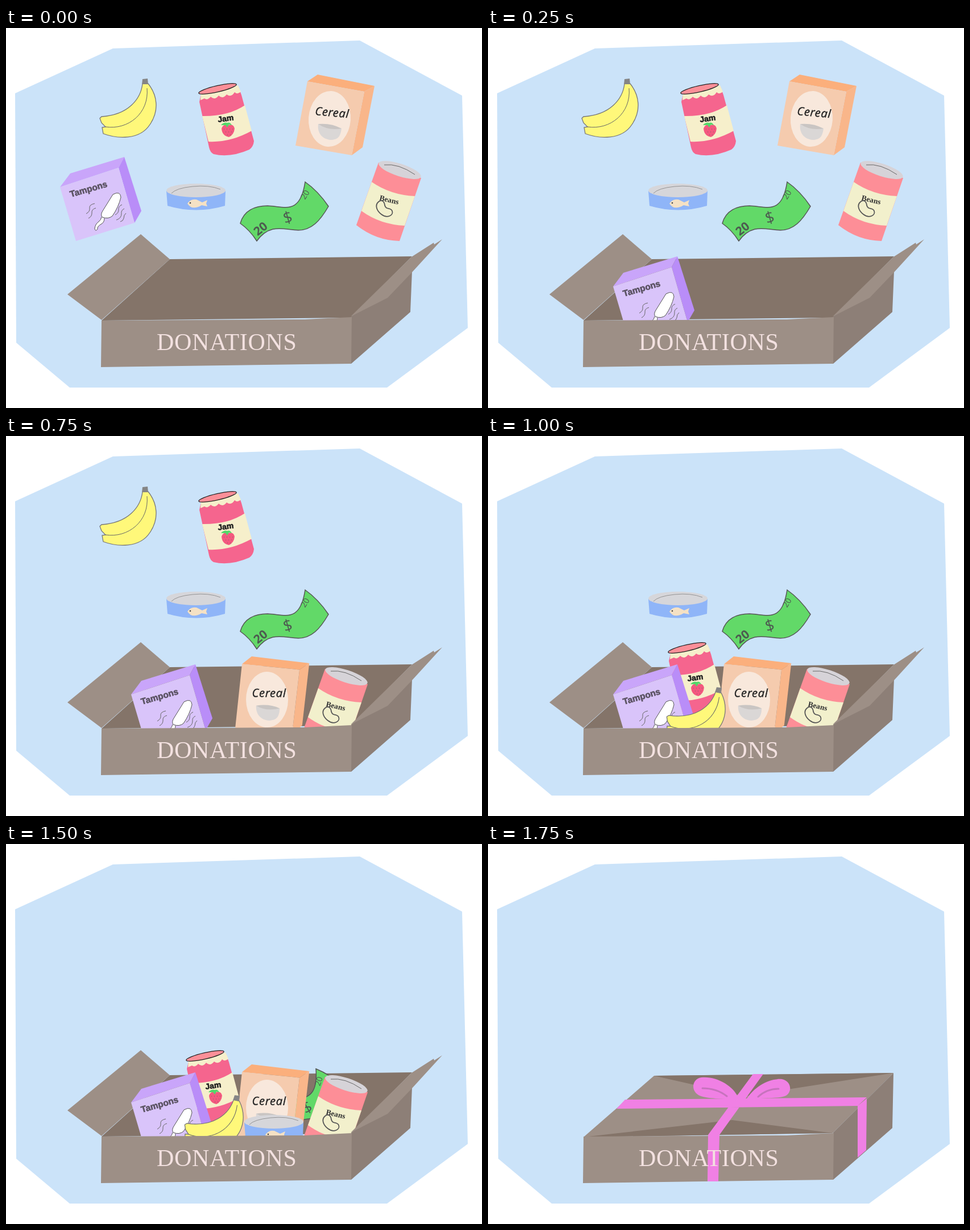
Write an HTML page that moves like this. It is 837 px wide and 669 px high and loops after 2 s.

```html
<!DOCTYPE html>
<html lang="en">
<head>
<meta charset="utf-8">
<title>Donation box</title>
<style>
html, body { margin: 0; width: 100%; height: 100%; overflow: hidden; background: #fff; }
svg { display: block; width: 837px; height: 669px; }
.line { fill: none; stroke: #666; stroke-width: 1; }
.bold { font: bold 15.5px "Liberation Sans", Arial, sans-serif; stroke-width: .6; }
.hand { font: 700 21px "Open Sans", sans-serif; fill: #4d5a50; text-anchor: middle; }
.card { fill: #9d8f86; }
.side { fill: #8d7f77; }
.dark { fill: #847469; }
.ribbon { fill: #f080e4; }
.fold { fill: none; stroke: #c673bd; stroke-width: 3; stroke-linecap: round; }
</style>
</head>
<body>
<svg viewBox="0 0 837 669">
  <path fill="#cbe3f9" d="M16 115 188 36 622 22 802 119 812 528 670 633H112L18 554Z"/>

  <g id="open">
    <path class="dark" d="M288 407 714 402 606 510 168 515Z"/>
    <path class="card" d="M237 363 288 407 168 514 108 469Z"/>

    <g id="money">
      <path fill="#62d968" stroke="#555" stroke-width="1.5" d="M412 344C418 321 438 313 460 313C490 314 517 330 526 271Q549 287 567 314C552 340 537 356 514 356C488 355 464 343 441 375Q429 356 412 344Z"/>
      <text class="hand" transform="translate(452 359) rotate(-38)">20</text>
      <text class="hand" transform="translate(530 296) rotate(-58)" style="font-size:14px;font-weight:400">20</text>
      <text class="hand" transform="translate(498 343) rotate(-16)" style="font-size:28px;font-weight:400">$</text>
    </g>

    <g id="jam">
      <path fill="#f5658e" d="M340 130 343 117 409 104 414 118 436 199Q435 209 428 214Q394 229 365 222Q359 219 357 210L346 158Z"/>
      <path fill="#f6efcb" d="M343 112 408 101 413 112Q407 118 402 113Q396 123 388 117Q381 126 374 119Q367 128 360 121Q354 128 349 124L342 127Z"/>
      <path fill="#f6efcb" d="M345 155Q390 156 420 136L432 181Q394 202 356 200Z"/>
      <ellipse cx="372" cy="107" rx="34" ry="5.500" transform="rotate(-13 372 107)" fill="#fc8f98" stroke="#222" stroke-width="1.3"/>
      <text class="bold" transform="translate(373 166) rotate(-8)" style="font-size:14px" fill="#222" stroke="#222">Jam</text>
      <path fill="#f4587f" d="M379 177Q382 168 391 171Q400 168 402 177Q401 188 392 192Q380 190 379 177Z"/>
      <path fill="#53d86a" d="M378 171Q383 165 389 167Q394 165 397 171L392 170 389 175 386 171Z"/>
      <path class="line" stroke-dasharray="1 4" d="M383 178H399M386 183H398M389 188H396"/>
    </g>

    <g id="tampons">
      <path fill="#c9a5fa" d="M95 280 113 256 208 227 198 246Z"/>
      <path fill="#b98df8" d="M198 246 208 227 238 322 226 343Z"/>
      <path fill="#d9c4fa" d="M95 280 198 246 226 343 123 375Z"/>
      <text class="bold" transform="translate(114 298) rotate(-16)" fill="#5b5363" stroke="#5b5363">Tampons</text>
      <path fill="#fff" stroke="#555" d="M188 293Q201 286 202 298Q198 315 187 331Q180 337 169 333Q166 328 170 322ZM173 335Q173 343 166 346Q160 350 161 354Q157 359 156 353Q157 345 163 341Q167 338 168 333"/>
      <path class="line" d="M156 309q-10 2-9 8q1 6-6 10M158 317q-8 2-7 9q0 6-6 9M204 311q-7 3-6 9q0 6-6 9M208 318q-6 3-5 9q0 8-9 11M211 326q-4 3-4 9q-1 5-6 6"/>
    </g>

    <g id="cereal">
      <path fill="#fbaf7c" d="M530 94 548 82 648 102 630 112Z"/>
      <path fill="#f9b68a" d="M630 112 648 102 627 210 608 224Z"/>
      <path fill="#f5cbae" d="M530 94 630 112 608 224 509 207Z"/>
      <ellipse cx="569" cy="160" rx="37" ry="49" transform="rotate(4 569 160)" fill="#f8e8dc"/>
      <path fill="#dad7d6" d="M549 169 590 177C588 191 584 197 570 197C555 195 547 184 549 169Z"/>
      <path fill="#c9c5c3" d="M549 169Q572 167 590 177Q566 181 549 169Z"/>
      <text transform="translate(543 153) rotate(5)" style="font:italic 20px 'Open Sans',sans-serif;letter-spacing:.8px" fill="#222" stroke="#222" stroke-width=".4">Cereal</text>
    </g>

    <g id="banana">
      <path fill="#fff87a" stroke="#777" stroke-width="1.3" d="M240 98C237 125 215 153 168 156L165 159 168 167 175 174 169 175 171 186C195 195 235 198 253 170C270 145 266 118 250 98Z"/>
      <path class="line" d="M175 174C215 180 252 150 248 106"/>
      <path fill="#858585" d="M240 90 249 89 250 99 239 99Z"/>
    </g>

    <g id="can">
      <path fill="#8fb5f8" d="M282 287 284 313Q334 328 385 313L386 287Z"/>
      <ellipse cx="334" cy="286" rx="52" ry="12" fill="#d6d6da"/>
      <path class="line" stroke-opacity=".6" d="M291 291Q299 282 328 279T377 284"/>
      <path fill="#f5e1c4" d="M319 309Q325 300 335 302L345 307 354 303 352 309 354 314 344 312Q327 322 319 309Z"/>
      <circle cx="324" cy="308" r="1.3" fill="#444"/>
    </g>

    <g id="beans">
      <path fill="#fd8e97" d="M655 237 616 347Q650 374 692 375L730 264Z"/>
      <path fill="#f2f0cc" d="M643 271Q676 294 719 296L701 348Q658 346 625 322Z"/>
      <ellipse cx="692.500" cy="250" rx="39" ry="11" transform="rotate(18 692.500 250)" fill="#d6d3d8"/>
      <path class="line" d="M665 241Q690 238 719 258"/>
      <text transform="translate(656 303) rotate(13)" style="font:bold 13.5px 'Liberation Serif',serif" fill="#333">Beans</text>
      <path fill="none" stroke="#555" stroke-width="1.8" d="M655 306C648 312 652 322 660 328C670 336 682 330 679 322C676 315 668 321 666 312C665 304 660 302 655 306Z"/>
    </g>

    <path class="side" d="M607 508 714 428 711 500 607 591Z"/>
    <path class="card" d="M767 372 714 430 671 475 606 508 713 403 752 378 753 381Z"/>
  </g>

  <g id="closed">
    <path class="card" d="M292 408 713 403 606 509 168 516Z"/>
    <path class="dark" d="M292 408 713 403 451 444ZM168 516 429 486 606 509Z"/>
    <path class="side" d="M607 508 713 403 711 500 607 591Z"/>
  </g>

  <path class="card" d="M168 515 525 513 608 509 607 591 167 597Z"/>

  <g id="wrap">
    <path class="ribbon" d="M241 450 666 446 650 461 226 466ZM650 461 666 448 665 539 650 552ZM466 405H484L407 512 405 594H386L387 512Z"/>
    <path class="ribbon" d="M440 447C432 425 400 408 375 411C358 414 356 435 372 443C390 450 420 447 436 452ZM454 450C468 427 495 412 517 414C534 418 535 436 524 443C510 450 470 444 452 454Z"/>
    <path class="fold" d="M377 430Q402 430 420 444M475 445Q490 431 511 431"/>
  </g>

  <text x="265" y="567" style="font:42px 'Liberation Serif',serif;letter-spacing:.7px" fill="#f3e1e0">DONATIONS</text>
</svg>
<script>
const LOOP = 2000, STEP = 250, CLOSE = 7;
// Each item: the step at which it drops, and its place in the box
const drops = {
  tampons: [1, "translate(125 175)"],
  beans: [2, "translate(-94 173)"],
  cereal: [3, "translate(-116 306) rotate(-4.5 548 82)"],
  jam: [4, "translate(-22 266)"],
  banana: [4, "translate(161 352) rotate(12 239 95)"],
  money: [5, "translate(19 125) rotate(-13 525 271)"],
  can: [6, "translate(137 203)"]
};
const el = id => document.getElementById(id);
const show = (id, on) => el(id).setAttribute("visibility", on ? "visible" : "hidden");
const start = performance.now();

function draw() {
  const step = Math.floor((performance.now() - start) % LOOP / STEP);
  for (const [id, [at, place]] of Object.entries(drops))
    el(id).setAttribute("transform", step >= at ? place : "translate(0 0)");
  show("open", step < CLOSE);
  show("closed", step >= CLOSE);
  show("wrap", step >= CLOSE);
  requestAnimationFrame(draw);
}
draw();
</script>
</body>
</html>
```
